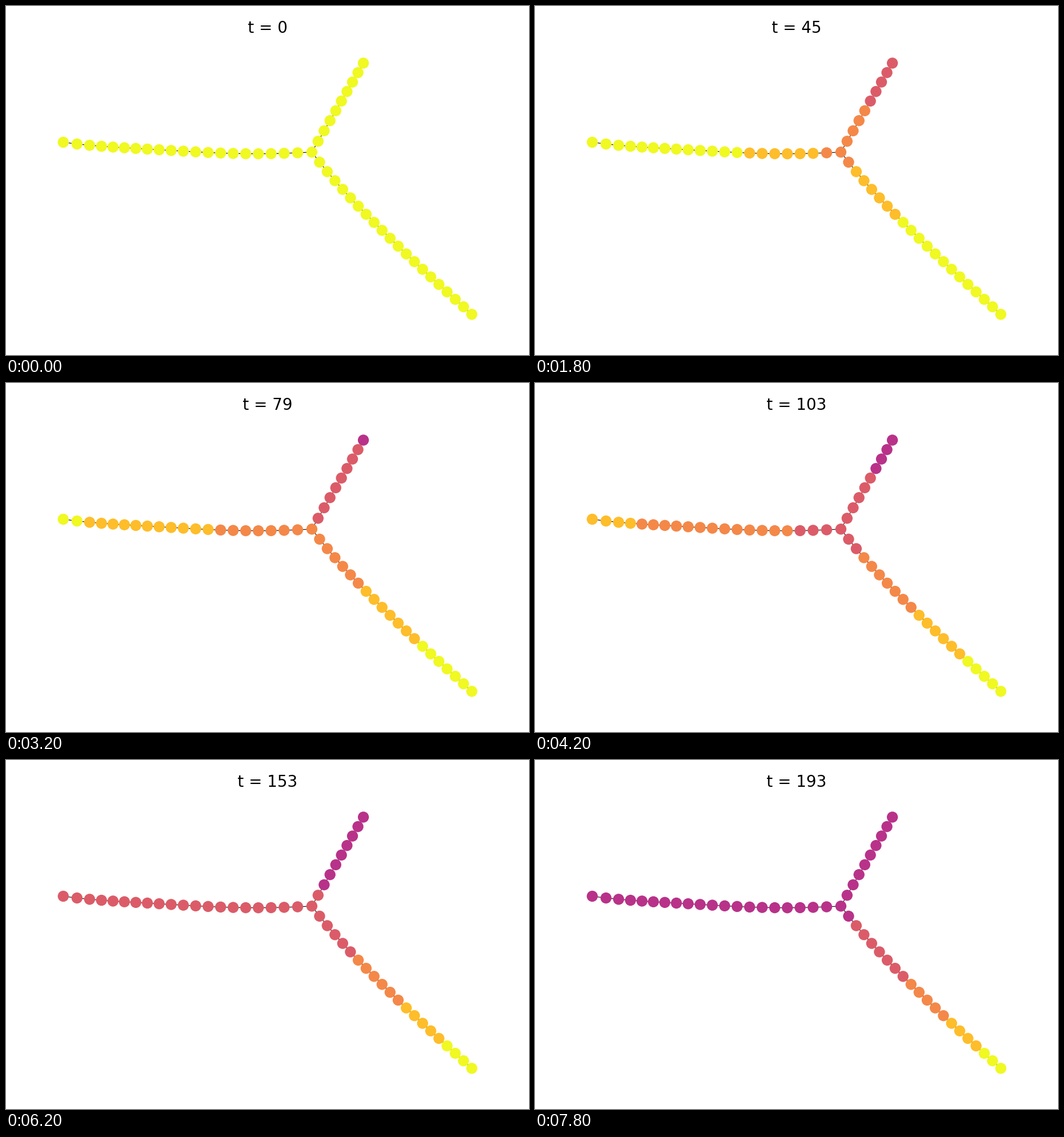
Write a matplotlib script that moves like this. It is 917 by 611 pixels and loops after 8 s.

```python
import numpy as np
import matplotlib.pyplot as plt
from matplotlib.animation import FuncAnimation

W, H, DPI = 917, 611, 100
FRAMES, STEP = 40, 200
DOT = 19.4 * 72 / DPI  # dot diameter in points
LEVELS = plt.get_cmap("plasma")(np.linspace(1, 0, 8))


def arm(n, s, x, y):
    """Smooth arm of n + 1 nodes through a few key points."""
    k = np.arange(n + 1)
    return np.column_stack([np.polyval(np.polyfit(s, v, len(s) - 1), k)
                            for v in (x, y)])


# every arm starts at the junction
left = arm(20, [0, 1, 3, 7, 13, 20],
           [536.3, 511.3, 464.8, 376.3, 247.9, 100.4],
           [255.8, 257.0, 258.5, 257.4, 250.5, 238.5])
up = arm(9, [0, 1, 5, 9],
         [536.3, 547.2, 588.1, 626.6],
         [255.8, 236.8, 166.4, 100.0])
down = arm(20, [0, 2, 6, 11, 16, 20],
           [536.3, 563.3, 617.6, 687.6, 759.0, 816.7],
           [255.8, 290.0, 350.4, 420.4, 487.4, 539.8])

# path order: upper tip to junction, then the left and the lower arm
nodes = np.vstack([up[::-1], left[1:], down[1:]])
STEM, PATH = len(up), 30
rank = np.arange(PATH)

# one front per colour level: it starts late and eases towards its reach
REACH = np.array([27.2, 24, 27, 20])
START = np.array([0.2, 0.5, 0.8, 14])
EASE = np.array([8.8, 13.5, 36, 33])
# the closed left arm fills up: its fronts speed up from these frames on
SURGE = np.array([11, 15, 18.5, FRAMES])
BACK_START, BACK_SPEED = 31, 3.6


def count_fronts(fronts):
    return (rank[:, None] < np.round(fronts)).sum(axis=1)


def levels(i):
    fronts = REACH * (1 - np.exp(-np.maximum(i - START, 0) / EASE))
    surge = 0.2 * np.maximum(i - SURGE, 0) ** 2
    lower = count_fronts(fronts)
    side = count_fronts(fronts + surge)
    # the last level returns from the closed end
    back = BACK_SPEED * max(i - BACK_START, 0)
    side[rank >= max(PATH - back, STEM)] = len(REACH)
    return np.concatenate([side, lower[STEM:]])


def clock(i):
    return np.interp(i, [0, 5, 12, 16, 21, 39], [0, 25.6, 59.5, 79, 103, 193])


fig = plt.figure(figsize=(W / DPI, H / DPI), dpi=DPI, facecolor="white")
ax = fig.add_axes([0, 0, 1, 1])
ax.set_xlim(0, W)
ax.set_ylim(H, 0)
ax.axis("off")

for line in (left, up, down):
    ax.plot(*line.T, color="black", lw=0.8, zorder=1)
dots = ax.scatter(*nodes.T, s=DOT ** 2, linewidths=0, zorder=2)
title = ax.text(W / 2, 47.2, "", fontsize=20, family="DejaVu Sans",
                ha="center", va="baseline", color="black")


def draw(i):
    dots.set_facecolor(LEVELS[levels(i)])
    title.set_text(f"t = {clock(i):.3g}")
    return dots, title


anim = FuncAnimation(fig, draw, frames=FRAMES, interval=STEP,
                     init_func=lambda: draw(0), repeat=True, repeat_delay=0)
plt.show()
```
